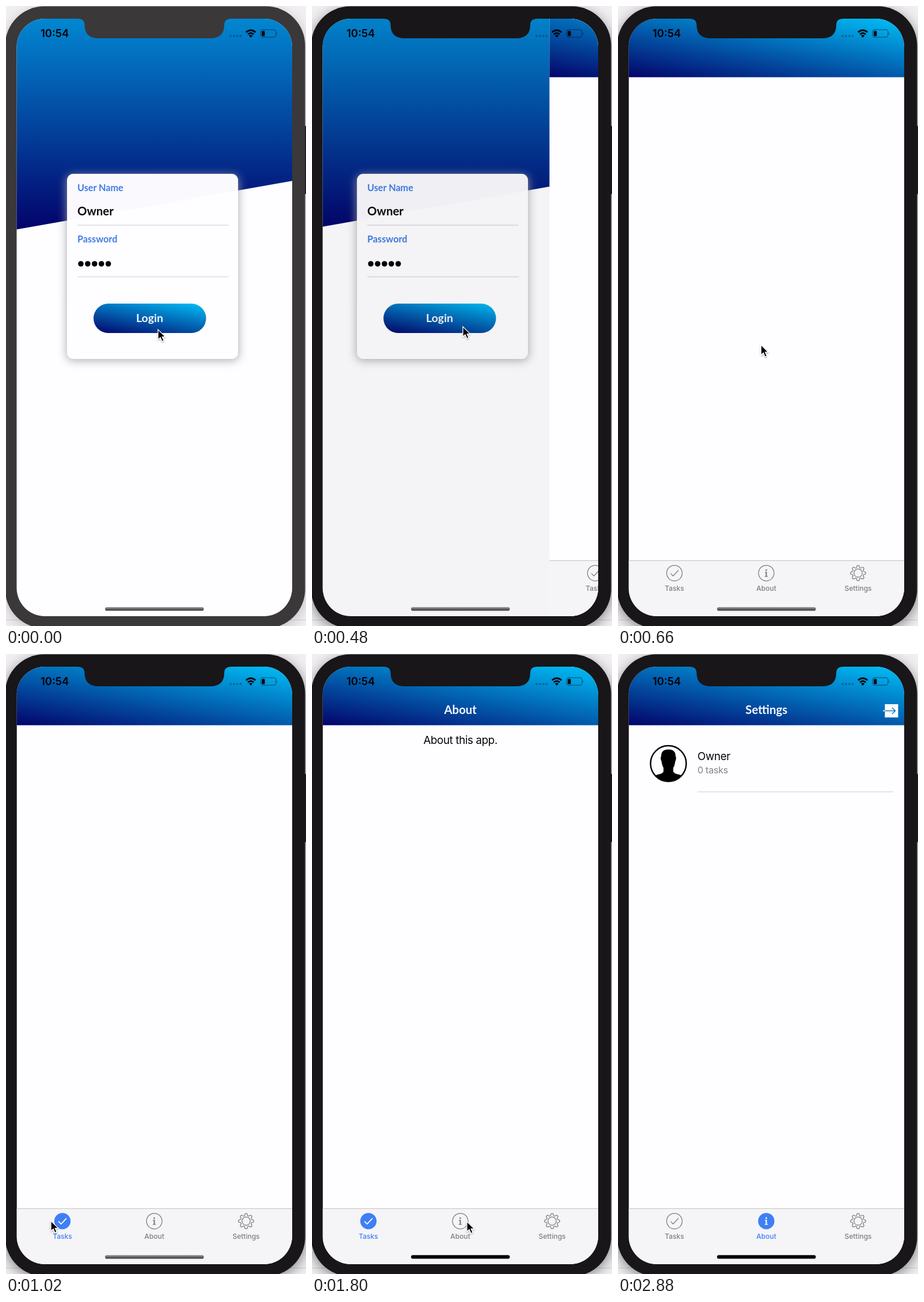
An HTML page that plays this animation: 521 px wide and 1075 px high, repeating every 3.12 s.

```html
<!DOCTYPE html>
<html lang="en">
<head>
<meta charset="utf-8">
<title>Login and tabs</title>
<style>
html, body { margin: 0; width: 100%; height: 100%; overflow: hidden; background: #f1eff2; }
svg { display: block; width: 100vw; height: 100vh; }
.round { font-family: Lato, "Open Sans", sans-serif; font-weight: 700; }
.sys { font-family: Inter, Roboto, sans-serif; }
.body { font-size: 18.8px; letter-spacing: -.02em; fill: #050505; }
.label { font-size: 16.2px; fill: #3f7de4; }
.title { font-size: 20.4px; fill: #f6f9ff; text-anchor: middle; }
.tab text { font-size: 12px; font-weight: 500; text-anchor: middle; fill: #7e7e83; }
.tab .line { fill: none; stroke: #7e7e83; stroke-width: 1.3; stroke-linecap: round; stroke-linejoin: round; }
.tab .glyph { fill: #7e7e83; }
.tab .disc { fill: none; stroke: #7e7e83; stroke-width: 1.3; }
.tab.on text { fill: #3f7ff6; }
.tab.on .disc { fill: #3f7ff6; stroke: #3f7ff6; }
.tab.on .line { stroke: #fff; stroke-width: 1.7; }
.tab.on .glyph { fill: #fff; }
.rule { stroke: #dddce0; stroke-width: 1.3; }
</style>
</head>
<body>
<svg viewBox="0 0 521 1075" preserveAspectRatio="none">
  <defs>
    <linearGradient id="sky" gradientUnits="userSpaceOnUse" x1="0" y1="22" x2="0" y2="387">
      <stop offset="0" stop-color="#0287d1"/>
      <stop offset="1" stop-color="#03036b"/>
    </linearGradient>
    <linearGradient id="barGrad"><stop stop-color="#04046a"/><stop offset="1" stop-color="#00c0f8"/></linearGradient>
    <linearGradient id="btnGrad"><stop stop-color="#04046a"/><stop offset="1" stop-color="#00c0f8"/></linearGradient>
    <linearGradient id="homeGrad" x2="0" y2="1">
      <stop stop-color="#98979a"/>
      <stop offset="1" stop-color="#363538"/>
    </linearGradient>
    <filter id="glow" x="-20%" y="-20%" width="140%" height="140%"><feGaussianBlur stdDeviation="8"/></filter>
    <filter id="soft" x="-10%" y="-10%" width="120%" height="120%"><feGaussianBlur stdDeviation="12"/></filter>
    <filter id="tipShade" x="-50%" y="-50%" width="200%" height="200%">
      <feDropShadow dx="0" dy="1.2" stdDeviation="1" flood-opacity=".4"/>
    </filter>
    <clipPath id="screen"><rect x="18.5" y="22" width="478.5" height="1036" rx="49"/></clipPath>
    <clipPath id="face"><circle cx="87.5" cy="190" r="31"/></clipPath>
  </defs>

  <rect width="521" height="1075" fill="#f1eff2"/>
  <rect id="shade" x="-1.5" y="8" width="521" height="1075" rx="68" filter="url(#soft)"/>
  <path d="M0 1064.5H60M470 1064.5H521" stroke="#000" stroke-opacity=".13"/>
  <rect x="517.8" y="208" width="6" height="118" rx="1.5" fill="#1c1a1c"/>
  <rect class="bezel" x="-1.5" y=".5" width="521" height="1078.5" rx="68"/>

  <g clip-path="url(#screen)">
    <g id="login">
      <rect x="18" y="22" width="700" height="1037" fill="#fefdff"/>
      <path d="M18 22H718V264.2L18 387.6Z" fill="url(#sky)"/>
      <rect x="105" y="293" width="299" height="322" rx="11" fill="#a3a2a6" opacity=".85" filter="url(#glow)"/>
      <rect x="106" y="291" width="297" height="321" rx="11" fill="#fefdff"/>
      <path d="M106 372V302Q106 291 117 291H392Q403 291 403 302V319.8Z" fill="#2a4fc0" opacity=".02"/>
      <text class="round label" x="124" y="321">User Name</text>
      <text class="round" x="124" y="363" font-size="20.4" fill="#0a0a0a">Owner</text>
      <path class="rule" d="M124 380H386.500M124 469.500H386.500"/>
      <text class="round label" x="124" y="410">Password</text>
      <g id="dots" fill="#050505"></g>
      <rect x="152" y="516" width="195.500" height="51" rx="25.500" fill="url(#btnGrad)"/>
      <text class="round" x="249.500" y="547.500" font-size="19.500" text-anchor="middle" fill="#f4f8ff">Login</text>
    </g>
    <rect id="dim" x="18" y="22" width="480" height="1037"/>

    <g id="home">
      <rect x="18.500" y="22" width="479" height="1037" fill="#fefdff"/>
      <rect x="18.500" y="22" width="479" height="101.500" fill="url(#barGrad)"/>
      <g id="about">
        <text class="round title" x="257.700" y="104">About</text>
        <text class="sys body" x="257.700" y="156" text-anchor="middle">About this app.</text>
      </g>
      <g id="settings">
        <text class="round title" x="257.700" y="104">Settings</text>
        <rect x="463.500" y="87" width="23" height="23" fill="#fff"/>
        <path d="M460 98.500H464" stroke="#fff" stroke-width="1.500"/>
        <path d="M464 98.500H481M476 93L481.500 98.500L476 104" fill="none" stroke="#0d78c0" stroke-width="1.500"/>
        <g clip-path="url(#face)">
          <path d="M75 177Q75 165.500 87.500 165.500T100 177Q102 181 99.500 186Q98 195 96 197V204Q98 208 106 209Q114 211 117 217V224H58V217Q61 211 69 209Q77 208 79 204V197Q77 195 75.500 186Q73 181 75 177Z"/>
        </g>
        <circle cx="87.500" cy="190" r="31" fill="none" stroke="#050505" stroke-width="2.500"/>
        <text class="sys body" x="138" y="184">Owner</text>
        <text class="sys" x="138" y="207" font-size="16.200" letter-spacing="-.02em" fill="#838287">0 tasks</text>
        <path class="rule" d="M138 239H478"/>
      </g>
      <rect x="18.500" y="961.500" width="479" height="98" fill="#f5f4f7"/>
      <path d="M18.500 961.500H497.500" stroke="#cfced3" stroke-width="1.300"/>
      <g class="tab" transform="translate(98 983.300)">
        <circle class="disc" r="13.500"/>
        <path class="line" d="M-6.500 .8L-2.300 5L6.500 -4.500"/>
        <text class="sys" y="30.500">Tasks</text>
      </g>
      <g class="tab" transform="translate(257.500 983.300)">
        <circle class="disc" r="13.500"/>
        <circle class="glyph" cy="-5.400" r="1.500"/>
        <path class="glyph" d="M-2.600 -2.300H1.100V5.300H2.700V6.500H-2.700V5.300H-1.100V-1.100H-2.600Z"/>
        <text class="sys" y="30.500">About</text>
      </g>
      <g class="tab" transform="translate(417 983.300)">
        <path id="gear" class="line"/>
        <circle class="line" r="7.200"/>
        <text class="sys" y="30.500">Settings</text>
      </g>
    </g>

    <rect id="homeBar" x="172" y="1042.300" width="171.500" height="6.200" rx="3.100"/>
    <text class="sys" x="84.700" y="54.300" font-size="18.400" font-weight="600" text-anchor="middle">10:54</text>
    <path d="M390 52h.01M396 52h.01M401.800 52h.01M407.500 52h.01" stroke="#000" stroke-opacity=".25" stroke-width="4" stroke-linecap="round"/>
    <path d="M416.800 45.600Q425.100 38.400 433.400 45.600M420 49Q425.100 44.600 430.200 49" fill="none" stroke="#000" stroke-width="2.700"/>
    <path d="M425.100 54.700L422 51.400Q425.100 48.800 428.200 51.400Z"/>
    <rect x="442.300" y="41.200" width="26.500" height="13" rx="3.600" fill="none" stroke="#000" stroke-opacity=".45" stroke-width="1.200"/>
    <rect x="444.200" y="43.200" width="5.200" height="9" rx="1.500"/>
    <path d="M470.300 45.500Q472.400 47.700 470.300 50Z" fill-opacity=".5"/>
  </g>

  <path class="bezel" d="M124 20V22Q136.500 22 136.500 33Q136.500 56 161 56H354.500Q379 56 379 33Q379 22 391.500 22V20Z"/>
  <path id="cursor" d="M0 0V17.600L4.100 13.800L7 20.600L10.200 19.200L7.300 12.600H12.700Z" stroke="#fff" stroke-width="1.300" filter="url(#tipShade)"/>
</svg>
<script>
const LOOP = 3120, STEP = 60, LAST = 2880;
const PAGE_W = 478.5;
const $ = id => document.getElementById(id);
const tabs = document.querySelectorAll('.tab');
const bezels = document.querySelectorAll('.bezel');

const clamp = x => Math.max(0, Math.min(1, x));
const ease = x => { x = clamp(x); return x * x * (3 - 2 * x); };
const show = (node, on) => { node.style.display = on ? '' : 'none'; };

// Corner-to-corner gradient tilted 10 degrees over a box
function tilt(id, x, y, w, h) {
  const a = Math.PI / 18, s = Math.sin(a), c = Math.cos(a);
  const half = (w * s + h * c) / 2, cx = x + w / 2, cy = y + h / 2;
  const g = $(id);
  g.setAttribute('gradientUnits', 'userSpaceOnUse');
  g.setAttribute('x1', cx - half * s);
  g.setAttribute('y1', cy + half * c);
  g.setAttribute('x2', cx + half * s);
  g.setAttribute('y2', cy - half * c);
}

function gearPath() {
  const pts = [];
  for (let i = 0; i < 96; i++) {
    const a = i / 96 * 2 * Math.PI;
    const r = 11.5 + 1.8 * Math.tanh(2 * Math.cos(8 * a));
    pts.push((r * Math.sin(a)).toFixed(2) + ' ' + (-r * Math.cos(a)).toFixed(2));
  }
  return 'M' + pts.join('L') + 'Z';
}

tilt('barGrad', 18.5, 22, PAGE_W, 101.5);
tilt('btnGrad', 152, 516, 195.5, 51);
$('gear').setAttribute('d', gearPath());
$('dots').innerHTML = [0, 1, 2, 3, 4]
  .map(i => `<circle cx="${130 + 11.9 * i}" cy="447" r="4.8"/>`).join('');

// Pointer moves: start, end, destination
const moves = [
  [240, 420, 262, 556],
  [600, 960, 78, 983],
  [1140, 1680, 269, 984],
  [1860, 2280, 425, 984]
];

function pointer(t) {
  let x = 264, y = 561;
  for (const [from, to, tx, ty] of moves) {
    const k = ease((t - from) / (to - from));
    x += (tx - x) * k;
    y += (ty - y) * k;
  }
  return `translate(${x} ${y})`;
}

function draw(time) {
  const t = Math.min(LAST, Math.floor(time / STEP) * STEP);
  const active = t >= 240;
  const push = ease((t - 450) / 112);

  bezels.forEach(b => b.setAttribute('fill', active ? '#181618' : '#3a3839'));
  $('shade').setAttribute('opacity', active ? .5 : .22);

  $('login').setAttribute('transform', `translate(${-.33 * PAGE_W * push} 0)`);
  $('dim').setAttribute('opacity', .22 * push);
  $('home').setAttribute('transform', `translate(${PAGE_W * (1 - push)} 0)`);
  show($('login'), push < 1);
  show($('home'), push > 0);

  const onSettings = t >= 2580;
  show($('about'), t >= 1740 && !onSettings);
  show($('settings'), onSettings);
  // The highlight trails one tap behind the content
  tabs[0].classList.toggle('on', t >= 960 && !onSettings);
  tabs[1].classList.toggle('on', onSettings);

  $('homeBar').setAttribute('fill', t >= 1380 ? '#050505' : 'url(#homeGrad)');
  $('cursor').setAttribute('transform', pointer(t));
  show($('cursor'), t < 2760);
}

const start = performance.now();
function tick() {
  draw((performance.now() - start) % LOOP);
  requestAnimationFrame(tick);
}
tick();
</script>
</body>
</html>
```
